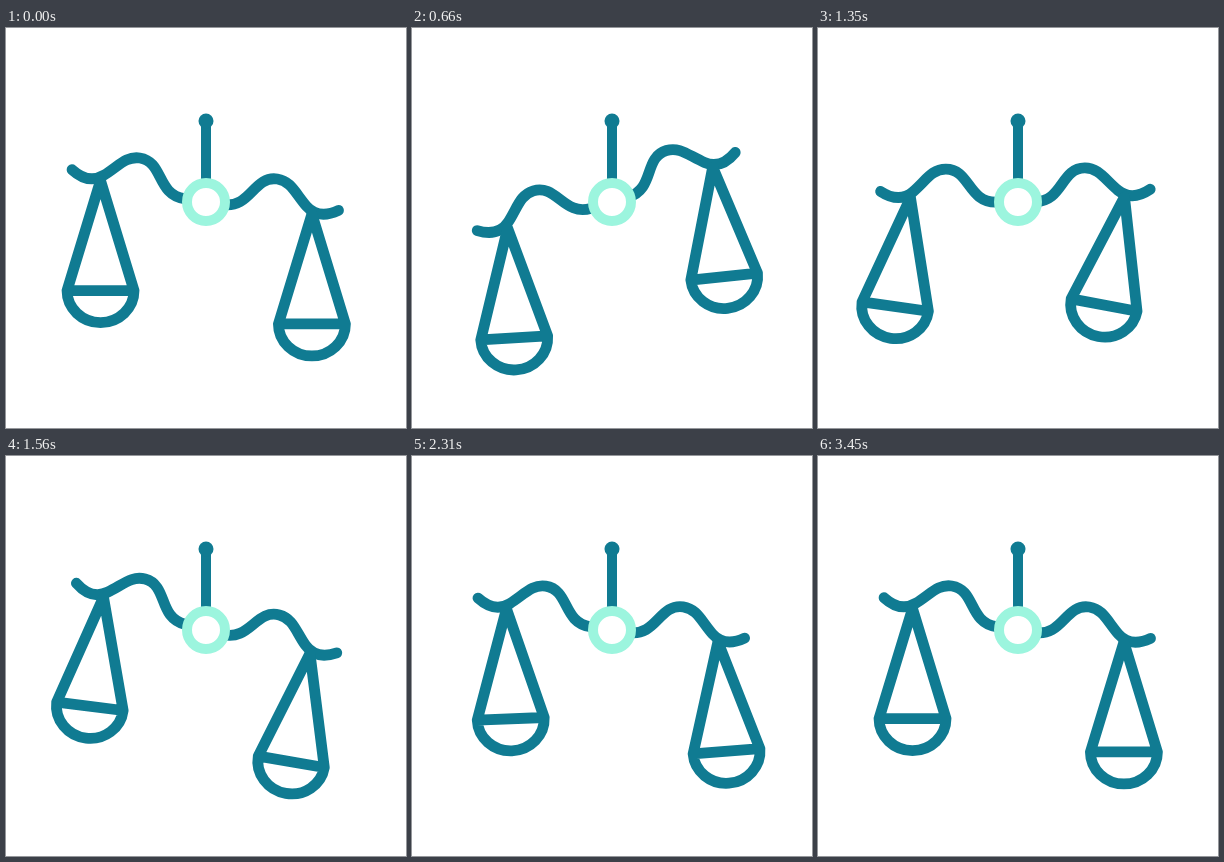
Write an HTML page that moves like this. It is 400 px wide and 400 px high and loops after 5630 ms.

```html
<!DOCTYPE html>
<html>
<head>
<meta charset="utf-8">
<style>
html, body { margin: 0; width: 100%; height: 100%; overflow: hidden; background: #fff; }
svg { display: block; width: 100%; height: 100%; }
</style>
</head>
<body>
<svg viewBox="-200 -174 400 400" fill="none" stroke="#107b92" stroke-width="10" stroke-linecap="round" stroke-linejoin="round">
  <defs>
    <path id="arm" d="M-137.3-11.7C-125-3.5-114-3.5-105-11C-92-22-86-33.5-72-33.5C-48-33.5-50 0-22 0"/>
    <path id="pan" d="M0 0L-33.5 110A33.5 32 0 0 0 33.5 110ZM-33.5 110H33.5"/>
  </defs>
  <path d="M0-81V-20"/>
  <circle cy="-81" r="7.5" fill="#107b92" stroke="none"/>
  <g stroke-width="10.8">
    <g id="beam">
      <use href="#arm"/>
      <use href="#arm" transform="matrix(-1 0 0 1 -5 0)"/>
    </g>
    <use id="left" href="#pan"/>
    <use id="right" href="#pan"/>
  </g>
  <circle r="19" stroke="#9cf5de" fill="#fff"/>
</svg>
<script>
const LOOP = 5630, STEP = 30, END = 3450;
const byId = id => document.getElementById(id);
const beam = byId('beam'), left = byId('left'), right = byId('right');

// Keys are [time in ms, angle in degrees].
const beamKeys = [[0, 8.7], [890, -19.3], [1815, 18.9], [2550, 6.6], [END, 8.7]];
const leftKeys = [[0, 0], [360, -6.2], [1430, 8.2], [2100, -3], [2800, 0.6], [END, 0]];
const rightKeys = [[0, 0], [360, -10], [1430, 11], [2200, -5], [2800, 1], [END, 0]];

const smooth = x => x * x * (3 - 2 * x);

// Ease in and out like cubic-bezier(.6, 0, .4, 1).
function sharp(x) {
  let lo = 0, hi = 1;
  for (let i = 0; i < 20; i++) {
    const s = (lo + hi) / 2, r = 1 - s;
    if (1.8 * s * r * r + 1.2 * s * s * r + s * s * s < x) lo = s; else hi = s;
  }
  return smooth(lo);
}

function angleAt(keys, t, ease) {
  const i = keys.findIndex(k => k[0] > t);
  if (i < 0) return keys[keys.length - 1][1];
  const [t0, a] = keys[i - 1], [t1, b] = keys[i];
  return a + (b - a) * ease((t - t0) / (t1 - t0));
}

function hang(pan, x, y, tilt, swing) {
  const r = tilt * Math.PI / 180, c = Math.cos(r), s = Math.sin(r);
  pan.setAttribute('transform', `translate(${x * c - y * s} ${x * s + y * c}) rotate(${swing})`);
}

function draw(now) {
  const t = Math.min(Math.floor(now % LOOP / STEP) * STEP, END);
  const tilt = angleAt(beamKeys, t, sharp);
  beam.setAttribute('transform', `rotate(${tilt})`);
  hang(left, -107.5, -5.2, tilt, angleAt(leftKeys, t, smooth));
  hang(right, 106.5, -4.2, tilt, angleAt(rightKeys, t, smooth));
}

const start = performance.now();
function tick() {
  draw(performance.now() - start);
  requestAnimationFrame(tick);
}
tick();
</script>
</body>
</html>
```
